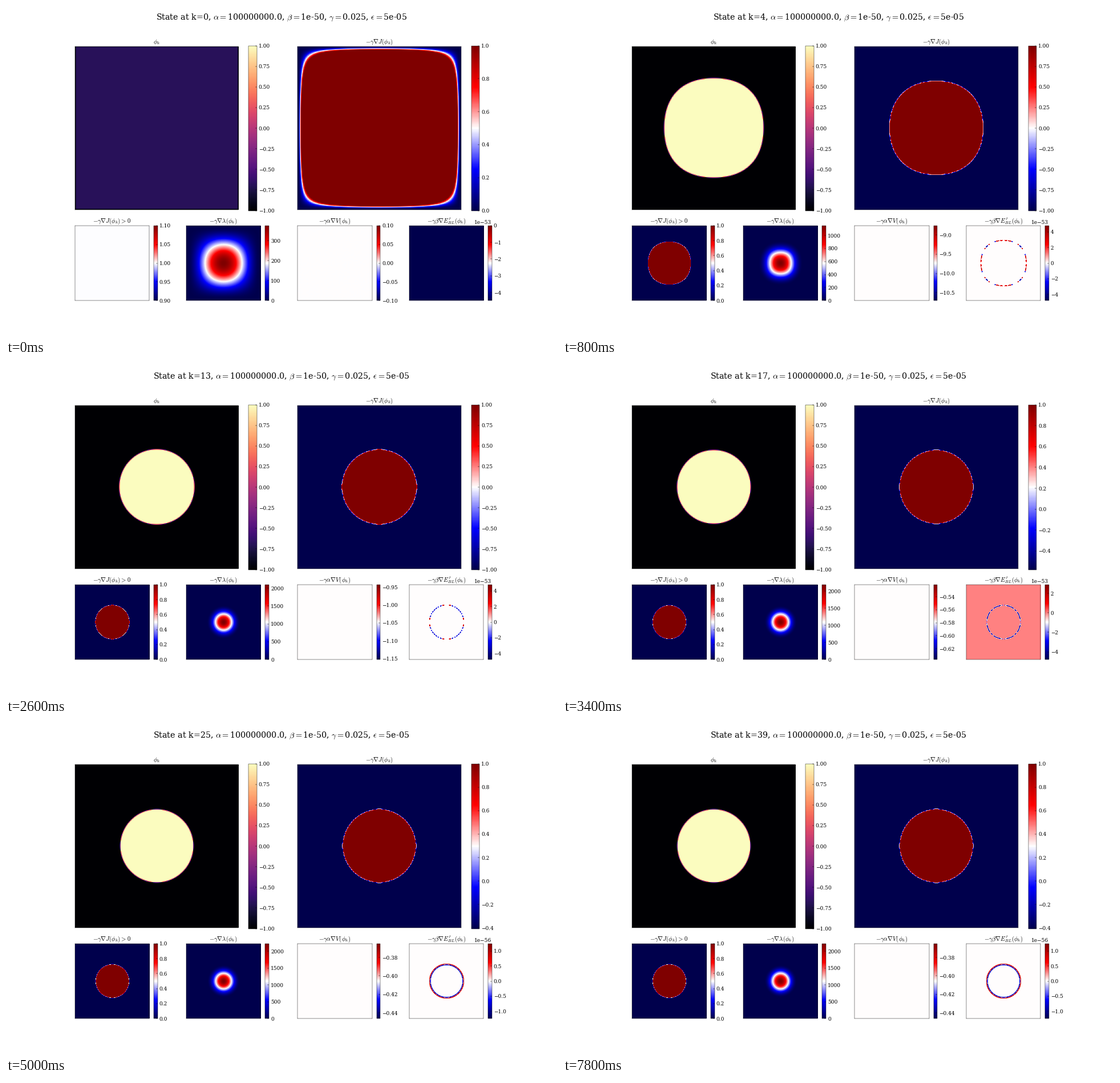
A matplotlib script that plays this animation: 966x580 px, repeating every 8000 ms.

```python
import numpy as np
import matplotlib.pyplot as plt
from matplotlib.animation import FuncAnimation
from matplotlib.colors import Normalize

SCALE = 0.644
FRAMES, INTERVAL = 40, 200
SETTLED = 24          # the shape no longer moves after this step
N = 201               # grid cells per side
HALF = 143.2          # half side of the big panels, in pixels
CELL = 2 * HALF / N

plt.rcParams.update({
    "font.family": "DejaVu Serif",
    "mathtext.fontset": "cm",
    "font.size": 10 * SCALE,
    "axes.titlesize": 12 * SCALE,
    "axes.titlepad": 6 * SCALE,
    "axes.linewidth": 0.5 * SCALE,
    "ytick.direction": "in",
    "ytick.major.size": 3 * SCALE,
    "ytick.major.width": 0.5 * SCALE,
    "ytick.major.pad": 3.5 * SCALE,
})

axis = (np.arange(N) - N // 2) * CELL
X, Y = np.meshgrid(axis, axis)
RAD = np.hypot(X, Y)
ANGLE = np.arctan2(np.abs(Y), np.abs(X))
FOLD = np.minimum(ANGLE, np.pi / 2 - ANGLE) / (np.pi / 4)   # 0 on axis, 1 on diagonal
SQUARE = HALF - CELL - np.maximum(np.abs(X), np.abs(Y))     # distance to the border cells
BORDER = SQUARE < 0

# squared first eigenfunction of the unit disk, J0(2.405 r)^2
rho = np.linspace(0, 1, 300)
arc = (np.arange(64) + 0.5) * np.pi / 64
DISK = np.cos(2.4048 * rho[:, None] * np.sin(arc)).mean(axis=1) ** 2

# squared first eigenfunction of the square
side = np.cos(np.clip(axis / (HALF - CELL), -1, 1) * np.pi / 2) ** 2
BOX = 376 * np.outer(side, side)


def volume(k):
    """Size of the volume term, decaying to its equilibrium value."""
    if k < 2:
        return 55.0 * k
    steps = [2, 4, 9, 17, 21, 24]
    excess = [19.4, 9.325, 2.375, 0.174, 0.008, 0.0006]
    return 0.405 + np.exp(np.interp(k, steps, np.log(excess)))


def radius(k):
    return np.sqrt(volume(k) / 0.00268 + 3931)


def squareness(k):
    return 0.045 * 0.75 ** (k - 4)


def outline(k):
    """Distance from the centre to the interface in every direction."""
    bulge = squareness(k) * (1 - np.cos(4 * ANGLE)) / 2
    return radius(k) * (1 + bulge)


def distance(k):
    return SQUARE if k < 2 else outline(k) - RAD


def phase(k):
    if k == 0:
        return np.where(BORDER, -1, -0.68)
    return np.clip(1.4 * distance(k), -1, 1)


def eigen_term(k):
    if k < 2:
        return BOX, 376
    peak = 9.1e6 / (radius(k) ** 2 * (1 + squareness(k)))
    return peak * np.interp(RAD / outline(k), rho, DISK, right=0), peak


def descent(k):
    if k == 0:
        return np.clip(BOX, 0, 1), 0
    low = -min(volume(k), 1)
    d = distance(k + 1)
    if k > 11:
        d = d + 0.9 * np.exp(-(FOLD / 0.12) ** 2)   # small tips on the axes
    return np.clip(2 * d, low, 1), low


def energy_term(k):
    """Values and colour range of the last panel."""
    if k == 0:
        return np.full((N, N), -4.48), -4.48, 0
    d = distance(k)
    if k >= 23:
        wave = np.clip(-1.9 * np.sin(np.pi * d / 3), -1.25, 1.25)
        return np.where(np.abs(d) < 3, wave, 0), -1.25, 1.25
    ring = np.abs(d) < 1.3
    if k >= 19:
        dots = (np.abs(FOLD - 0.13) < 0.03) | (np.abs(FOLD - 0.6) < 0.025)
        return np.where(ring & dots, -4.55, 0), -4.55, 0
    rng = np.random.default_rng(k)
    cuts = np.minimum((FOLD * 16).astype(int), 15)
    if k < 8:
        sign = rng.choice([-1, 0, 0, 1], 16)
    else:
        odds = rng.random(16)
        near = 1 if k < 14 else -1
        sign = np.where(np.arange(16) > 5,
                        np.where(odds < 0.75, -1, 0),
                        np.where(odds < 0.5, near, 0))
    sign[0] = 0
    top = 4.8 if k < 14 else 2.91
    return np.where(ring, 4.8 * sign[cuts], 0), -4.8, top


fig = plt.figure(figsize=(9.66, 5.8), dpi=100)
grid = fig.add_gridspec(3, 4)
head = fig.suptitle("", fontsize=16 * SCALE)


def panel(spot, title, cmap="seismic"):
    ax = fig.add_subplot(spot)
    ax.set_xticks([])
    ax.set_yticks([])
    ax.set_title(title)
    im = ax.imshow(np.zeros((N, N)), cmap=cmap, vmin=-1, vmax=1)
    return im, fig.colorbar(im, ax=ax)


phi_im, _ = panel(grid[:2, :2], r"$\phi_k$", "magma")
desc_im, _ = panel(grid[:2, 2:], r"$-\gamma\nabla J(\phi_k)$")
mask_im, _ = panel(grid[2, 0], r"$-\gamma\nabla J(\phi_k)>0$")
eig_im, _ = panel(grid[2, 1], r"$-\gamma\nabla\lambda(\phi_k)$")
vol_im, _ = panel(grid[2, 2], r"$-\gamma\alpha\nabla V(\phi_k)$")
en_im, en_bar = panel(grid[2, 3], r"$-\gamma\beta\nabla E_{BL}'(\phi_k)$")
power = en_bar.ax.text(1, 1.021, "", transform=en_bar.ax.transAxes,
                       ha="right", va="baseline")


def show(im, data, low, high):
    im.set_data(data)
    im.set_norm(Normalize(low, high))


def update(frame):
    head.set_text(f"State at k={frame}, " r"$\alpha=$100000000.0, "
                  r"$\beta=$1e-50, $\gamma=$0.025, $\epsilon=$5e-05")
    k = min(frame, SETTLED)

    phi_im.set_data(phase(k))
    data, low = descent(k)
    show(desc_im, data, low, 1)
    if k == 0:
        show(mask_im, np.ones((N, N)), 0.9, 1.1)
    else:
        show(mask_im, (data > 0).astype(float), 0, 1)

    data, peak = eigen_term(k)
    show(eig_im, data, 0, peak)

    v = volume(k)
    spread = 0.1 * v if v else 0.1
    show(vol_im, np.full((N, N), -v), -v - spread, -v + spread)

    show(en_im, *energy_term(k))
    power.set_text("1e\u221256" if k >= 23 else "1e\u221253")
    return []


anim = FuncAnimation(fig, update, frames=FRAMES, interval=INTERVAL,
                     repeat=True, repeat_delay=0, blit=False)
plt.show()
```
